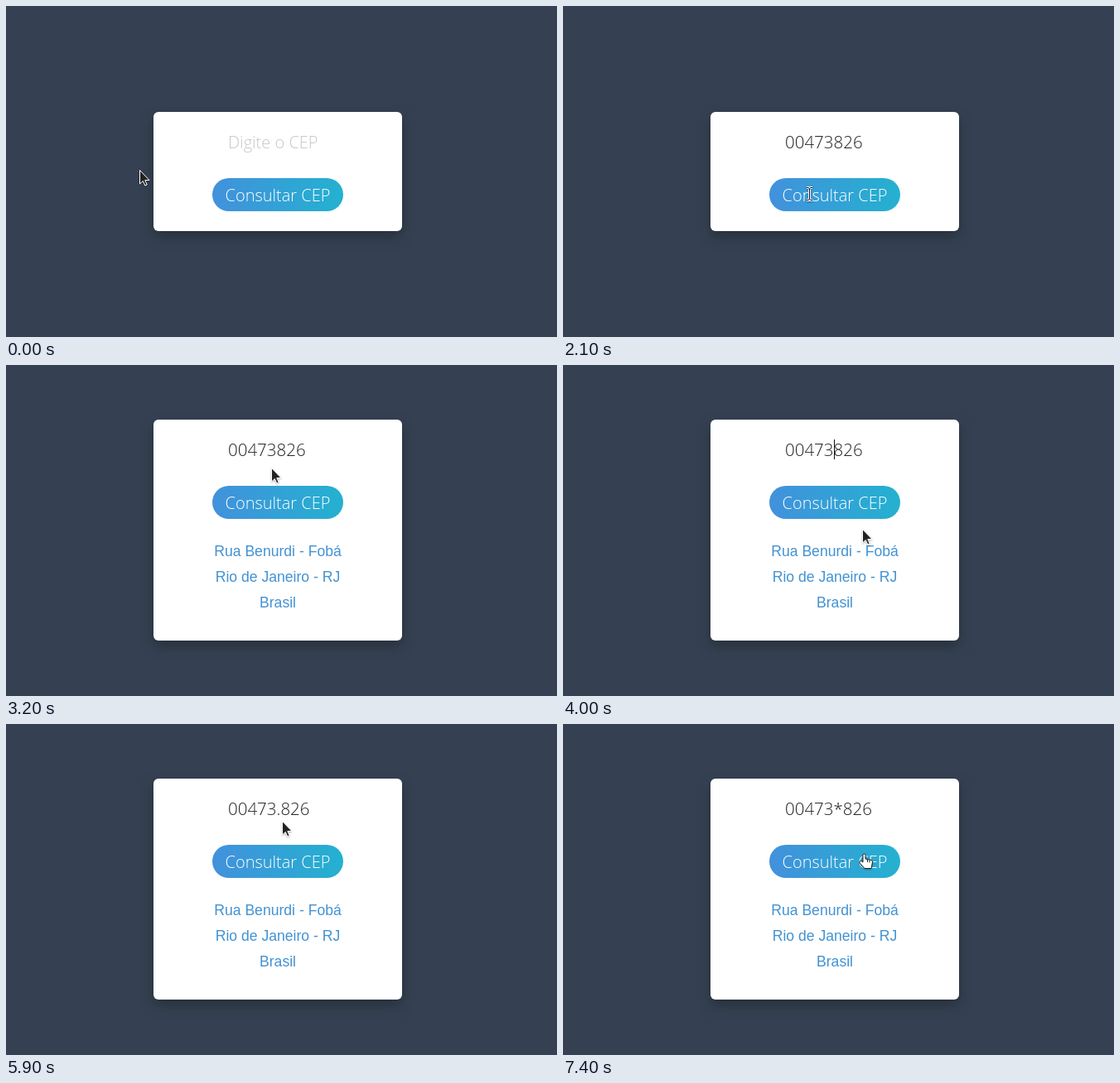
These frames come from a looping animation (665 px wide and 400 px high, 8 s). An HTML page:

```html
<!DOCTYPE html>
<html lang="pt-BR">
<head>
<meta charset="utf-8">
<title>Consulta de CEP</title>
<style>
  html, body { margin: 0; width: 100%; height: 100%; overflow: hidden; background: #354152; }
  svg { display: block; }
  .light { font: 300 20px "Open Sans", "Noto Sans", sans-serif; }
  #card { fill: #fff; filter: drop-shadow(0 7px 8px rgba(0, 0, 0, .27)); }
  #results { font: 17.6px "Liberation Sans", Arial, sans-serif; fill: #4292d3; text-anchor: middle; }
  #arrow, #beam, #hand { filter: drop-shadow(0 1px 1px rgba(0, 0, 0, .3)); }
</style>
</head>
<body>
<svg width="665" height="400" viewBox="0 0 665 400">
  <defs>
    <linearGradient id="blue">
      <stop stop-color="#4291dc"/>
      <stop offset="1" stop-color="#24b1d0"/>
    </linearGradient>
  </defs>
  <g id="panel">
    <rect id="card" x="178" width="300" height="144" rx="6"/>
    <text id="field" class="light" x="268" y="44"></text>
    <rect id="caret" y="24" width="1" height="24" fill="#111"/>
    <rect x="249" y="80" width="158" height="40" rx="20" fill="url(#blue)"/>
    <text class="light" x="328" y="108" text-anchor="middle" fill="#fff">Consultar CEP</text>
    <g id="results">
      <text x="328" y="165">Rua Benurdi - Fobá</text>
      <text x="328" y="196">Rio de Janeiro - RJ</text>
      <text x="328" y="227">Brasil</text>
    </g>
  </g>
  <g id="cursor">
    <path id="arrow" d="M.5 .5V17L4.3 13.5L6.8 19L9.2 18L6.8 12.5H12Z" fill="#222" stroke="#fff"/>
    <g id="beam" fill="none">
      <path d="M-3 -7.5H-1L.5 -6.5L2 -7.5H4M.5 -6.5V6.5M-3 7.5H-1L.5 6.5L2 7.5H4" stroke="#fff" stroke-width="3"/>
      <path d="M-3 -7.5H-1L.5 -6.5L2 -7.5H4M.5 -6.5V6.5M-3 7.5H-1L.5 6.5L2 7.5H4" stroke="#111"/>
    </g>
    <g id="hand" stroke="#222">
      <path d="M-2 10V1.5Q-2 0 -.5 0T1 1.5V6L8 7.5Q9.5 8 9.5 10L8 17.5H0L-6 10.8Q-6.5 8.3 -4.3 8.3Z" fill="#fff"/>
      <path d="M3.5 7V10M6 7.5V10.5" fill="none"/>
    </g>
  </g>
</svg>
<script>
const LOOP = 8000, STEP = 100, OPEN_AT = 2500;
const $ = id => document.getElementById(id);

// [first step, last step, x, y, shape on arrival]
const moves = [
  [0, 0, 161, 198, 'arrow'],
  [100, 400, 303, 156, 'beam'],
  [800, 900, 259, 175, 'arrow'],
  [1100, 1300, 233, 189, 'arrow'],
  [1400, 1400, 231, 199, 'arrow'],
  [1600, 1800, 301, 224, 'hand'],
  [2100, 2100, 297, 227, 'beam'],
  [2600, 3300, 323, 109, 'beam'],
  [3400, 3600, 326, 100, 'beam'],
  [3800, 4000, 361, 198, 'arrow'],
  [4500, 4500, 361, 205, 'arrow'],
  [4800, 5200, 332, 104, 'beam'],
  [5700, 5800, 333, 110, 'beam'],
  [5900, 5900, 333, 117, 'arrow'],
  [6000, 6100, 337, 159, 'hand'],
  [6300, 6400, 371, 157, 'hand'],
  [6500, 6500, 364, 157, 'hand']
];
const texts = [
  [0, 'Digite o CEP'], [1100, '00473826'], [4800, '00473.826'],
  [6800, '00473826'], [7200, '00473*826']
];
// [time, x], where 0 hides the caret
const carets = [
  [0, 0], [600, 268], [1100, 362], [1700, 0], [3600, 327], [4800, 331],
  [5200, 0], [6400, 331], [6800, 327], [7200, 336], [7400, 0]
];

const latest = (list, t) => list.findLastIndex(item => item[0] <= t);
const valueAt = (list, t) => list[latest(list, t)][1];
const show = (id, on) => $(id).style.display = on ? '' : 'none';

function cursorAt(t, top) {
  const i = latest(moves, t);
  const [start, end, toX, toY, shape] = moves[i];
  if (t >= end) return { x: toX, y: toY, shape };
  const [, , fromX, fromY] = moves[i - 1];
  const k = (t - start + STEP) / (end - start + STEP);
  const x = Math.round(fromX + (toX - fromX) * k);
  const y = Math.round(fromY + (toY - fromY) * k);
  const overButton = x > 249 && x < 407 && y > top + 80 && y < top + 120;
  return { x, y, shape: overButton ? 'hand' : 'arrow' };
}

function draw(time) {
  const t = Math.floor(time % LOOP / STEP) * STEP;
  const open = t >= OPEN_AT;
  const top = open ? 66 : 128;
  $('panel').setAttribute('transform', `translate(0 ${top})`);
  $('card').setAttribute('height', open ? 267 : 144);
  show('results', open);

  const empty = t < texts[1][0];
  $('field').textContent = valueAt(texts, t);
  $('field').style.fontSize = empty ? '20px' : '20.5px';
  $('field').setAttribute('fill', empty ? '#c3c6cc' : '#222');

  const caretX = valueAt(carets, t);
  $('caret').setAttribute('x', caretX);
  show('caret', caretX);

  const { x, y, shape } = cursorAt(t, top);
  $('cursor').setAttribute('transform', `translate(${x} ${y})`);
  for (const id of ['arrow', 'beam', 'hand']) show(id, id === shape);
}

const begin = performance.now();
function tick() {
  draw(performance.now() - begin);
  requestAnimationFrame(tick);
}
tick();
</script>
</body>
</html>
```
